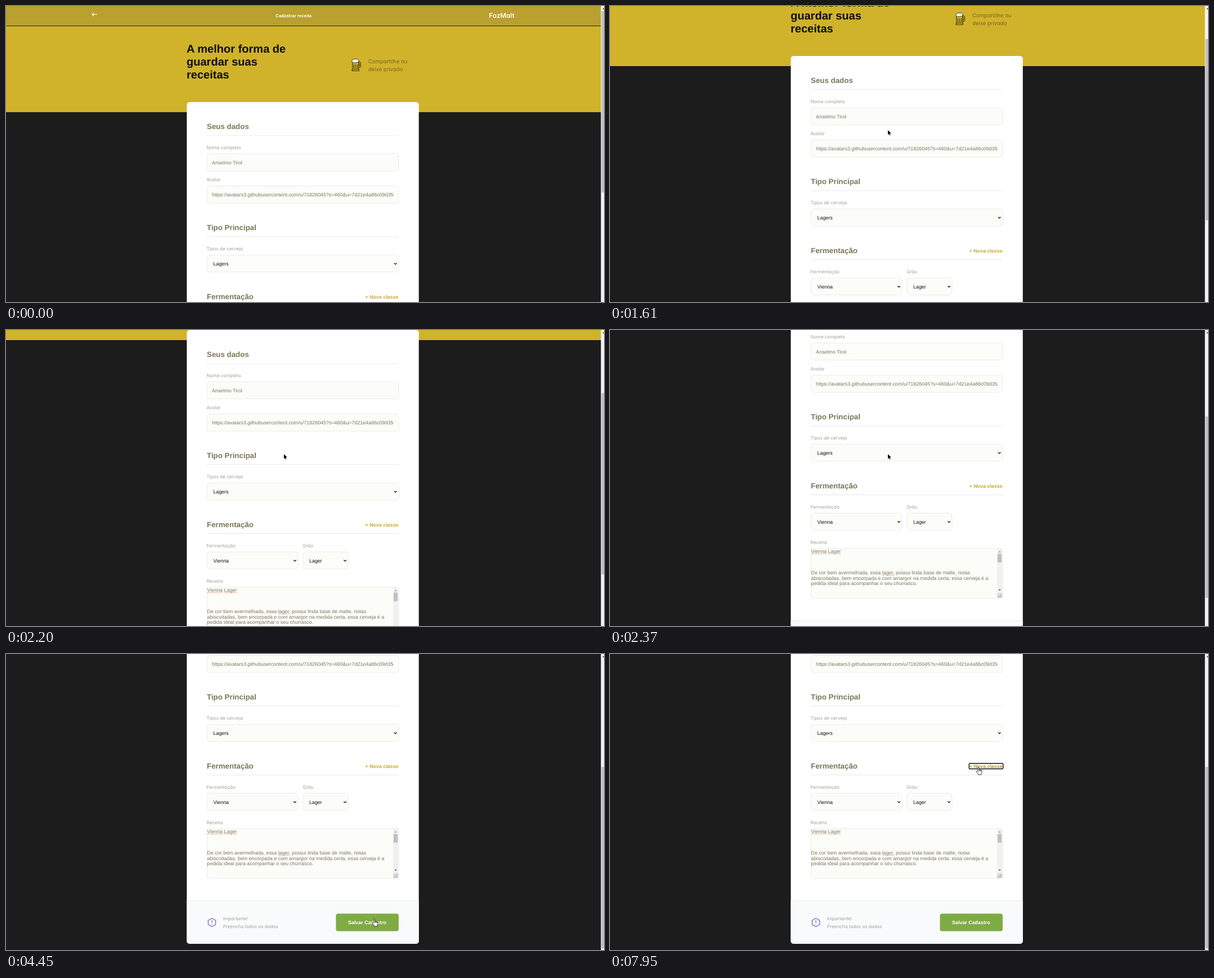
An HTML page for the animation above (8 s loop, 1063 by 527 pixels).

```html
<!DOCTYPE html>
<html lang="pt-BR">
<head>
<meta charset="utf-8">
<title>Cadastrar receita</title>
<style>
html, body { margin: 0; width: 100%; height: 100%; overflow: hidden; background: #1c1c1c; }
svg { display: block; }
text { font: 8.92px "Liberation Sans", Arial, sans-serif; fill: #7a7862; text-rendering: geometricPrecision; white-space: pre; }
.title { font-size: 20.05px; font-weight: bold; fill: #0e0d08; }
.h2 { font-size: 13.33px; font-weight: bold; fill: #7a7757; }
.label, .note, .lead, .logo { font-family: Inter, sans-serif; font-feature-settings: "cv11"; }
.label { font-size: 8.2px; fill: #a2a196; }
.note { font-size: 8.1px; fill: #a2a196; }
.lead { font-size: 9.55px; fill: #756727; }
.logo { font-size: 11.7px; font-weight: 600; fill: #fff; }
.head { font-size: 7.87px; font-weight: bold; fill: #fff; }
.value { fill: #111; }
.bold { font-weight: bold; }
.link { fill: #c9a92c; }
.link.hover { fill: #b0952c; }
.field { fill: #fcfcf8; stroke: #ededе7; stroke: #ededе7; stroke: #edede7; }
.rule { fill: #e9e9e6; }
.spell { stroke: #cf7a5c; stroke-width: .8; stroke-dasharray: 1.2 .7; }
</style>
</head>
<body>
<svg width="1063" height="527" viewBox="0 0 1063 527">
  <defs>
    <path id="chevron" d="M-2.2-1.1 0 1.1 2.2-1.1" fill="none" stroke="#111" stroke-width="1.3"/>
    <clipPath id="urlClip"><rect x="366" y="320" width="323" height="32"/></clipPath>
  </defs>
  <rect width="1063" height="527" fill="#1c1c1c"/>

  <g id="page">
    <rect width="1058" height="189" fill="#d0b32b"/>
    <rect width="1058" height="35.5" fill="#b9a02f"/>
    <rect y="35" width="1058" height="1" fill="#2b2710"/>
    <path d="M162 15H153M156.2 11.8 153 15l3.2 3.2" fill="none" stroke="#fff" stroke-width="1.2"/>
    <text class="head" x="479" y="20">Cadastrar receita</text>
    <text class="logo" x="858.5" y="21">FozMalt</text>
    <text class="title" x="321" y="82.5">A melhor forma de</text>
    <text class="title" x="321" y="106">guardar suas</text>
    <text class="title" x="321" y="129.4">receitas</text>

    <g fill="none" stroke="#1d190a" stroke-width=".9" stroke-linejoin="round">
      <path d="M627 99.5h1.6q1.9 0 1.9 2v6q0 2-1.9 2H627M627 102h1.2v5H627"/>
      <path d="M615.8 99v12.5l-1 3.8h13l-1-3.8V99"/>
      <path d="M615.6 112.4h11.4M618.3 104v7M621.3 104v7M624.3 104v7"/>
      <path d="M615.2 100.2q-1.4-3 1.2-4.2 1.4-2 4.4-1.6 3.4-.7 4.8 1.2 2.6 1 1.4 3.6-1.4 1.6-3.4.8-1.6 2.4-3.6.6-2.6 1.6-4.800-.4z" fill="#fff"/>
    </g>
    <text class="lead" x="644" y="102">Compartilhe ou</text>
    <text class="lead" x="644" y="116.3">deixe privado</text>

    <rect x="321.4" y="171" width="412.4" height="663" rx="5" fill="#fff"/>
    <path d="M321.4 757.5h412.4V829a5 5 0 0 1-5 5H326.4a5 5 0 0 1-5-5z" fill="#f9fafc"/>
    <rect class="rule" x="321.4" y="757" width="412.4" height="1"/>

    <text class="h2" x="357" y="218.7">Seus dados</text>
    <rect class="rule" x="357" y="230.5" width="341" height="1"/>
    <text class="label" x="356.5" y="254.5">Nome completo</text>
    <rect class="field" x="357.5" y="263" width="340.5" height="30.5" rx="4.5"/>
    <text x="366" y="281.8">Anselmo Tirol</text>
    <text class="label" x="356.5" y="312">Avatar</text>
    <rect class="field" x="357.5" y="320.5" width="340.5" height="30.5" rx="4.5"/>
    <text x="366" y="339.3" clip-path="url(#urlClip)">https://avatars3.githubusercontent.com/u/71826045?s=460&amp;u=7d21e4a86c09d35c</text>

    <text class="h2" x="357" y="398.8">Tipo Principal</text>
    <rect class="rule" x="357" y="410.2" width="341" height="1"/>
    <text class="label" x="356.5" y="434.8">Tipos de cerveja</text>
    <rect class="field" x="357.5" y="443.2" width="340.5" height="30.5" rx="4.5"/>
    <text class="value" x="368.5" y="462">Lagers</text>
    <use href="#chevron" x="692.3" y="458.8"/>

    <text class="h2" x="357" y="521.8">Fermentação</text>
    <text id="link" class="bold link" x="638.5" y="520.5">+ Nova classe</text>
    <rect id="ring" x="638.3" y="512.7" width="60.4" height="9.8" rx="1.5" fill="none" stroke="#101010" stroke-width="1.4"/>
    <rect class="rule" x="357" y="533" width="341" height="1"/>
    <text class="label" x="356.5" y="557.5">Fermentação</text>
    <text class="label" x="527.3" y="557.5">Grão</text>
    <rect class="field" x="357.5" y="566" width="161" height="30.5" rx="4.5"/>
    <rect class="field" x="528" y="566" width="80" height="30.5" rx="4.5"/>
    <text class="value" x="368.5" y="584.8">Vienna</text>
    <text class="value" x="539" y="584.8">Lager</text>
    <use href="#chevron" x="513.5" y="581.6"/>
    <use href="#chevron" x="602.7" y="581.6"/>

    <text class="label" x="356.5" y="620.5">Receita</text>
    <rect class="field" x="357.5" y="628.7" width="340.5" height="88.8" rx="3"/>
    <text x="357.5" y="637.3">Vienna Lager</text>
    <text x="357.5" y="675">De cor bem avermelhada, essa lager, possui linda base de malte, notas</text>
    <text x="357.5" y="684.5">abiscoitadas, bem encorpada e com amargor na medida certa, essa cerveja é a</text>
    <text x="357.5" y="694">pedida ideal para acompanhar o seu churrasco.</text>
    <path class="spell" d="M357.5 638.6h27.5M387.5 638.6h23M484 676.6h20"/>
    <rect x="688" y="629" width="9.5" height="79.5" fill="#f1f1f1"/>
    <rect x="689" y="638.5" width="7.2" height="15.3" fill="#c1c1c1"/>
    <path d="M690.5 635.8l2.2-2.4 2.2 2.4z" fill="#8a8a8a"/>
    <path d="M690.5 701.7l2.2 2.4 2.2-2.4z" fill="#444"/>
    <rect x="688" y="708.5" width="9.5" height="8.7" fill="#dcdcdc"/>
    <path d="M690 716l6-6M693.5 716l2.5-2.5" stroke="#8c8c8c" stroke-width=".9"/>

    <g fill="none" stroke="#6f5cc4" stroke-width="1.2" stroke-linejoin="round">
      <path d="M366 788.4l6.6 3.8v7.6l-6.6 3.8-6.6-3.8v-7.6z"/>
      <path d="M366 792.3v4.2M366 798.5v1.3"/>
    </g>
    <text class="note" x="385.7" y="792">Importante!</text>
    <text class="note" x="385.7" y="805.5">Preencha todos os dados</text>
    <rect x="586.5" y="780.2" width="111.5" height="31.3" rx="4" fill="#7fab44"/>
    <text class="bold" x="608" y="799.3" style="fill:#fff">Salvar Cadastro</text>
  </g>

  <rect x="1057.5" width="5.5" height="527" fill="#f3f3f3"/>
  <path d="M1060 6l2.3-2.6 2.3 2.6z" fill="#555"/>
  <rect id="thumb" x="1058.5" width="4.5" height="323" fill="#c1c1c1"/>

  <g id="cursor">
    <path id="arrow" d="M0 0v8.2l1.9-1.700 1.300 2.900 1.300-.6-1.300-2.800h2.600z" fill="#000" stroke="#fff" stroke-width=".5" paint-order="stroke"/>
    <path id="hand" d="M-1.2 8V1.3Q-1.1.3-.2.3.8.3.8 1.3V5Q2 4.3 2.6 5.4 3.8 4.8 4.3 5.9 5.8 5.4 5.9 7v2.8Q5.8 11.5 4.8 12.5V14H-.4v-1.2L-3.7 8.9Q-4.2 7.7-3.2 7.3-2.4 7.1-1.2 8zM.8 5v2.6M2.6 5.4v2.3M4.3 5.9v2" fill="#fff" stroke="#111" stroke-width=".8" stroke-linejoin="round"/>
    <path id="beam" d="M-2-5h1.5l.5.5.5-.5H2M0-4.5v9M-2 5h1.5l.5-.5.5.5H2" fill="none" stroke="#111" stroke-width=".9"/>
  </g>
</svg>

<script>
const LOOP = 8000;
const $ = id => document.getElementById(id);
const show = (id, on) => $(id).setAttribute("visibility", on ? "visible" : "hidden");

// [time, page offset], held until the next entry
const scrolls = [
  [0, 0], [1520, 7.4], [1610, 82], [1670, 136], [1740, 167], [1820, 169], [2200, 171],
  [2290, 198], [2370, 240], [2450, 277], [2530, 304], [2600, 318]
];

// Pointer moves: first and last step time, step count, end point, sideways bow
const linear = p => p;
const smooth = p => p * p * (3 - 2 * p);
const moves = [
  { t0: 190, t1: 580, n: 6, to: [714, 317], ease: linear },
  { t0: 810, t1: 1450, n: 9, to: [494, 221], ease: smooth },
  { t0: 2900, t1: 3680, n: 11, to: [657, 472], ease: smooth },
  { t0: 3760, to: [656, 473] },
  { t0: 4140, to: [656, 474] },
  { t0: 4220, to: [656, 473] },
  { t0: 4370, to: [655, 472] },
  { t0: 4450, to: [655, 471] },
  { t0: 6460, t1: 7230, n: 11, to: [661, 223], ease: smooth, bow: 18 },
  { t0: 7310, t1: 7710, n: 6, to: [655, 201], ease: smooth }
];

function scrollAt(t) {
  let y = 0;
  for (const [time, value] of scrolls) if (t >= time) y = value;
  return y;
}

function pointerAt(t) {
  let pos = [1052, 549];
  for (const { t0, t1, n = 1, to, ease = linear, bow = 0 } of moves) {
    if (t < t0) break;
    const step = n > 1 ? Math.floor((t - t0) / (t1 - t0) * (n - 1) + 1e-6) + 1 : 1;
    const p = Math.min(1, step / n);
    const e = ease(p);
    pos = [
      pos[0] + (to[0] - pos[0]) * e + bow * Math.sin(Math.PI * e),
      pos[1] + (to[1] - pos[1]) * e
    ];
    if (p < 1) break;
  }
  return pos.map(Math.round);
}

function draw(t) {
  const scroll = scrollAt(t);
  const [x, y] = pointerAt(t);
  const inside = (l, top, r, b) => x >= l && x <= r && y + scroll >= top && y + scroll <= b;
  const onLink = inside(638, 512, 699, 523);
  const onHand = onLink || inside(587, 780, 698, 811);
  const onText = inside(358, 629, 688, 717);

  $("page").setAttribute("transform", `translate(0 ${-scroll})`);
  $("thumb").setAttribute("y", 9 + scroll * .604);
  $("cursor").setAttribute("transform", `translate(${x} ${y})`);
  $("link").classList.toggle("hover", onLink);
  show("ring", t >= 7860);
  show("hand", t >= 190 && onHand);
  show("beam", t >= 190 && onText);
  show("arrow", t >= 190 && !onHand && !onText);
}

const start = performance.now();
function tick() {
  draw((performance.now() - start) % LOOP);
  requestAnimationFrame(tick);
}
tick();
</script>
</body>
</html>
```
